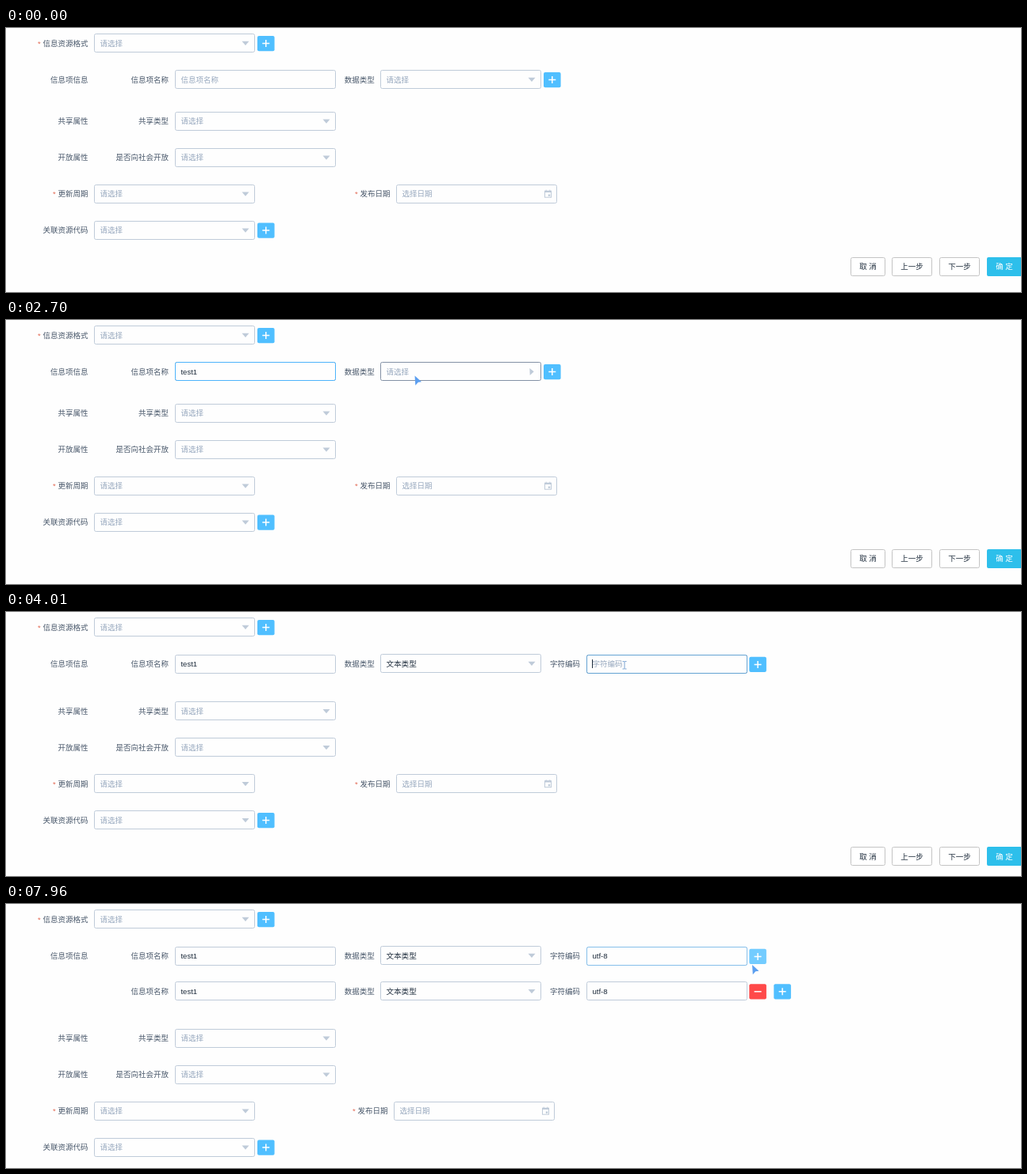
Animation, 1280 px wide and 334 px high, one loop 8000 ms. Source, as an HTML page:

```html
<!DOCTYPE html>
<html lang="zh-CN">
<head>
<meta charset="utf-8">
<title>Form</title>
<style>
html, body { margin: 0; width: 100%; height: 100%; overflow: hidden; background: #fefefe; }
svg { display: block; width: 1280px; height: 334px; }
text { font: 9.5px "Liberation Sans", "Noto Sans CJK SC", "Noto Sans CJK", sans-serif; white-space: pre; }
.label { fill: #48576a; text-anchor: end; }
.hint { fill: #97a8be; }
.value { fill: #1f2d3d; font-size: 9.6px; }
.mid { text-anchor: middle; }
</style>
</head>
<body>
<svg id="stage" viewBox="0 0 1280 334"></svg>
<script>
const LOOP = 8000;
const BLUE = '#20a0ff', FOCUS = '#4cb3fb', SKY = '#50bfff', LINE = '#bfcbd9', HOVER = '#8391a5';
const stage = document.getElementById('stage');
const pen = document.createElement('canvas').getContext('2d');
pen.font = '9.6px "Liberation Sans", sans-serif';

// Screen refreshes: [first, last, count]
const refreshes = [
  [0, 0, 1], [70, 760, 10], [1230, 1230, 1], [1530, 1530, 1], [2010, 2780, 11],
  [2850, 3080, 4], [3310, 4080, 11], [4480, 4480, 1], [4860, 4860, 1],
  [5090, 5090, 1], [5640, 5720, 2], [6180, 6330, 3], [6650, 6650, 1],
  [6880, 6880, 1], [7110, 7880, 11], [7960, 7960, 1]
];
const ticks = refreshes.flatMap(([a, b, n]) =>
  Array.from({ length: n }, (_, i) => n > 1 ? a + (b - a) * i / (n - 1) : a));

// Pointer path: [time, x, y]
const path = [
  [70, 1066, 279], [607, 330, 69], [683, 315, 66], [2087, 315, 66], [2620, 515.5, 70.5],
  [2850, 515.5, 70.5], [3080, 560, 88], [3310, 560, 88], [3464, 622, 84], [3541, 622, 84],
  [3926, 780, 67], [6255, 780, 67], [6330, 782, 68], [7030, 782, 68], [7110, 787.5, 68.5],
  [7650, 941, 74], [7880, 941, 75], [7960, 941, 77]
];

const nameKeys = [[1530, 'test'], [2010, 'test1']];
const codeKeys = [[4860, 'u'], [5090, 'ut'], [5720, 'utf'], [6255, 'utf-'], [6880, 'utf-8']];
const nameCaret = [[680, 1230], [1530, 2540]];
const codeCaret = [[3990, 4480], [4860, 5640], [5720, 6180], [6255, 6650], [6880, 7420]];

const ramp = (t, a, b) => Math.min(1, Math.max(0, (t - a) / (b - a)));
const smooth = u => u * u * (3 - 2 * u);
const typed = (keys, t) => keys.reduce((s, [at, str]) => t >= at ? str : s, '');
const shown = (spans, t) => spans.some(([a, b]) => t >= a && t < b);

function pointerAt(t) {
  if (t < path[0][0]) return null;
  const i = path.findIndex(p => p[0] > t);
  if (i < 0) return path[path.length - 1].slice(1);
  const [a, x, y] = path[i - 1], [b, x2, y2] = path[i];
  const u = smooth(ramp(t, a, b));
  return [x + (x2 - x) * u, y + (y2 - y) * u];
}

const text = (x, y, s, cls, extra = '') =>
  `<text x="${x}" y="${y + 3.5}" class="${cls}" ${extra}>${s}</text>`;

const rect = (x, y, w, h, fill, extra = '') =>
  `<rect x="${x}" y="${y}" width="${w}" height="${h}" fill="${fill}" ${extra}/>`;

// One-pixel outline, 24 high, centred on y and kept on whole pixels
const outline = (x, y, w, fill, stroke, opacity = 1) =>
  rect(x + .5, Math.round(y - 12) + .5, w - 1, 23, fill, `rx="2" stroke="${stroke}" opacity="${opacity}"`);

function label(x, y, s, required) {
  const star = required ? text(x - s.length * 9.5 - 6.5, y, '*', '', 'fill="#e26a55"') : '';
  return star + text(x, y, s, 'label');
}

function field(x, y, hint, { value = '', focus = 0, hover = false } = {}) {
  return outline(x, y, 203, 'none', hover ? HOVER : LINE) +
    (focus ? outline(x, y, 203, 'none', FOCUS, focus) : '') +
    text(x + 7.4, y, value || hint, value ? 'value' : 'hint');
}

function select(x, y, opts = {}) {
  const turn = -180 * (opts.turn || 0);
  return field(x, y, '请选择', opts) +
    `<path d="M-4.5 -2.5H4.5L0 2.7Z" fill="${LINE}" transform="translate(${x + 191} ${y + .3}) rotate(${turn})"/>`;
}

function square(x, y, fill = SKY, minus = false) {
  const d = `M${x + 6.3} ${y}h9` + (minus ? '' : `M${x + 10.8} ${y - 4.5}v9`);
  return rect(x, y - 9.6, 21.6, 19.3, fill, 'rx="2"') +
    `<path d="${d}" stroke="#fff" stroke-width="1.5"/>`;
}

function button(x, y, w, s, main) {
  const box = main
    ? rect(x, Math.round(y - 12), w, 24, '#2dbfeb', 'rx="2"')
    : outline(x, y, w, '#fff', '#c4c4c4');
  return box + text(x + w / 2, y, s, 'mid', `fill="${main ? '#fff' : '#1f2d3d'}"`);
}

function calendar(x, y) {
  return `<g fill="none" stroke="${LINE}">` +
    `<rect x="${x - 4}" y="${y - 3.5}" width="8" height="8"/>` +
    `<path d="M${x - 4} ${y - 2.7}h8" stroke-width="2"/>` +
    `<path d="M${x - 2.3} ${y - 5}v2M${x + 2.3} ${y - 5}v2"/></g>` +
    rect(x + .3, y + .8, 2.4, 2.4, LINE);
}

function caret(x, y, str) {
  const end = Math.floor(x + 7.4 + pen.measureText(str).width);
  return rect(end, Math.round(y - 6), 1, 11, '#1f2d3d');
}

function squiggle(x, y, w) {
  let d = `M${x} ${y}`;
  for (let i = 1; i * 1.25 <= w; i++) d += `L${x + i * 1.25} ${y + (i % 2) * 1.3}`;
  return `<path d="${d}" fill="none" stroke="#e8413c" stroke-width=".8"/>`;
}

function menu(k, picked) {
  if (k <= 0) return '';
  return `<g transform="translate(472.5 81) scale(1 ${k})" opacity="${k}">` +
    rect(0, 0, 202.5, 57, '#fff', 'rx="2" stroke="#d1dbe5" stroke-width=".8"') +
    rect(.5, 4, 201.5, 24, picked ? BLUE : '#e4e8f1') +
    text(7.4, 16, '文本类型', '', `fill="${picked ? '#fff' : '#48576a'}"`) +
    text(7.4, 40, '非文本类型', '', 'fill="#48576a"') + '</g>';
}

function cursor([x, y], beam) {
  const d = beam
    ? 'M-2.5 -4.5H-.8L0 -4L.8 -4.5H2.5M0 -4V4.5M-2.5 5H-.8L0 4.5L.8 5H2.5'
    : 'M0 0L8.5 7.8L4.3 8.2L.8 12.3Z';
  const look = beam ? 'fill="none" stroke="#7da5d3"' : 'fill="#5c9ff0"';
  return `<path d="${d}" ${look} transform="translate(${x} ${y})"/>`;
}

function draw(t) {
  const picked = t >= 3460, added = t >= 7960;
  const dy = added ? 52 : picked ? 7.5 : 0;
  const nameY = picked ? 65.5 : 65;
  const p = pointerAt(t);
  const over = (x, y, w, h) => !!p && p[0] >= x && p[0] <= x + w && p[1] >= y && p[1] <= y + h;
  const overName = over(213, 53, 203, 24);
  const overCode = picked && over(732, 54, 203, 24);
  const name = typed(nameKeys, t), code = typed(codeKeys, t);
  const kind = picked ? '文本类型' : '';
  const plusX = picked ? 937.3 : 678, plusY = picked ? 66.4 : 65.6;

  const opening = 1 - Math.pow(1 - ramp(t, 2720, 3000), 3);
  const open = picked ? 1 - ramp(t, 3464, 3564) : opening;
  const turn = picked ? 1 - ramp(t, 3464, 3620) : ramp(t, 2600, 2800);
  const nameFocus = ramp(t, 600, 750) * (1 - ramp(t, 2710, 2860));
  const kindFocus = ramp(t, 2710, 2860) * (1 - ramp(t, 3400, 3530));
  const codeFocus = ramp(t, 3920, 4075) * (1 - ramp(t, 7890, 8030));

  let s = label(103.5, 19, '信息资源格式', true) + select(111, 19) + square(317, 19.6);

  s += label(103.5, 65, '信息项信息') + label(205, 65, '信息项名称') +
    field(213, nameY, '信息项名称', { value: name, focus: nameFocus, hover: overName }) +
    label(464.7, 65, '数据类型') +
    select(472, 65, { value: kind, focus: kindFocus, hover: over(472, 53, 203, 24), turn }) +
    square(plusX, plusY, over(plusX, 56, 22, 22) ? '#73ccff' : SKY);
  if (shown(nameCaret, t)) s += caret(213, nameY, name);

  if (picked) {
    s += label(724, 65.5, '字符编码') +
      field(732, 65.7, '字符编码', { value: code, focus: codeFocus, hover: overCode });
    if (shown(codeCaret, t)) s += caret(732, 65.7, code);
    if (t >= 6255 && t < 7875) s += squiggle(739.5, 70.5, 10);
  }
  if (added) {
    s += label(205, 110.3, '信息项名称') + field(213, 110.3, '', { value: name }) +
      label(464.7, 110.3, '数据类型') + select(472, 110.3, { value: kind }) +
      label(724, 110.3, '字符编码') + field(732, 110.3, '', { value: code }) +
      square(937.3, 110.8, '#ff4949', true) + square(968.3, 110.8);
  }

  const dateX = added ? 489 : 492;
  s += label(103.5, 117.7 + dy, '共享属性') + label(205, 117.7 + dy, '共享类型') + select(213, 117.7 + dy) +
    label(103.5, 163.7 + dy, '开放属性') + label(205, 163.7 + dy, '是否向社会开放') + select(213, 163.7 + dy) +
    label(103.5, 209.7 + dy, '更新周期', true) + select(111, 209.7 + dy) +
    label(dateX - 7.5, 209.7 + dy, '发布日期', true) + field(dateX, 209.7 + dy, '选择日期') +
    calendar(dateX + 191.5, 209.7 + dy) +
    label(103.5, 255.7 + dy, '关联资源代码') + select(111, 255.7 + dy) + square(317, 256.1 + dy);

  s += button(1065, 301.7 + dy, 44, '取 消') + button(1117, 301.7 + dy, 51, '上一步') +
    button(1177, 301.7 + dy, 51, '下一步') + button(1237, 301.7 + dy, 44, '确 定', true);

  s += menu(open, picked);
  if (p) s += cursor(p, overName || overCode);
  stage.innerHTML = s;
}

let last = -1;
function frame() {
  const now = performance.now() % LOOP;
  const tick = ticks.filter(k => k <= now + 5).pop();
  if (tick !== last) draw(last = tick);
  requestAnimationFrame(frame);
}
frame();
</script>
</body>
</html>
```
